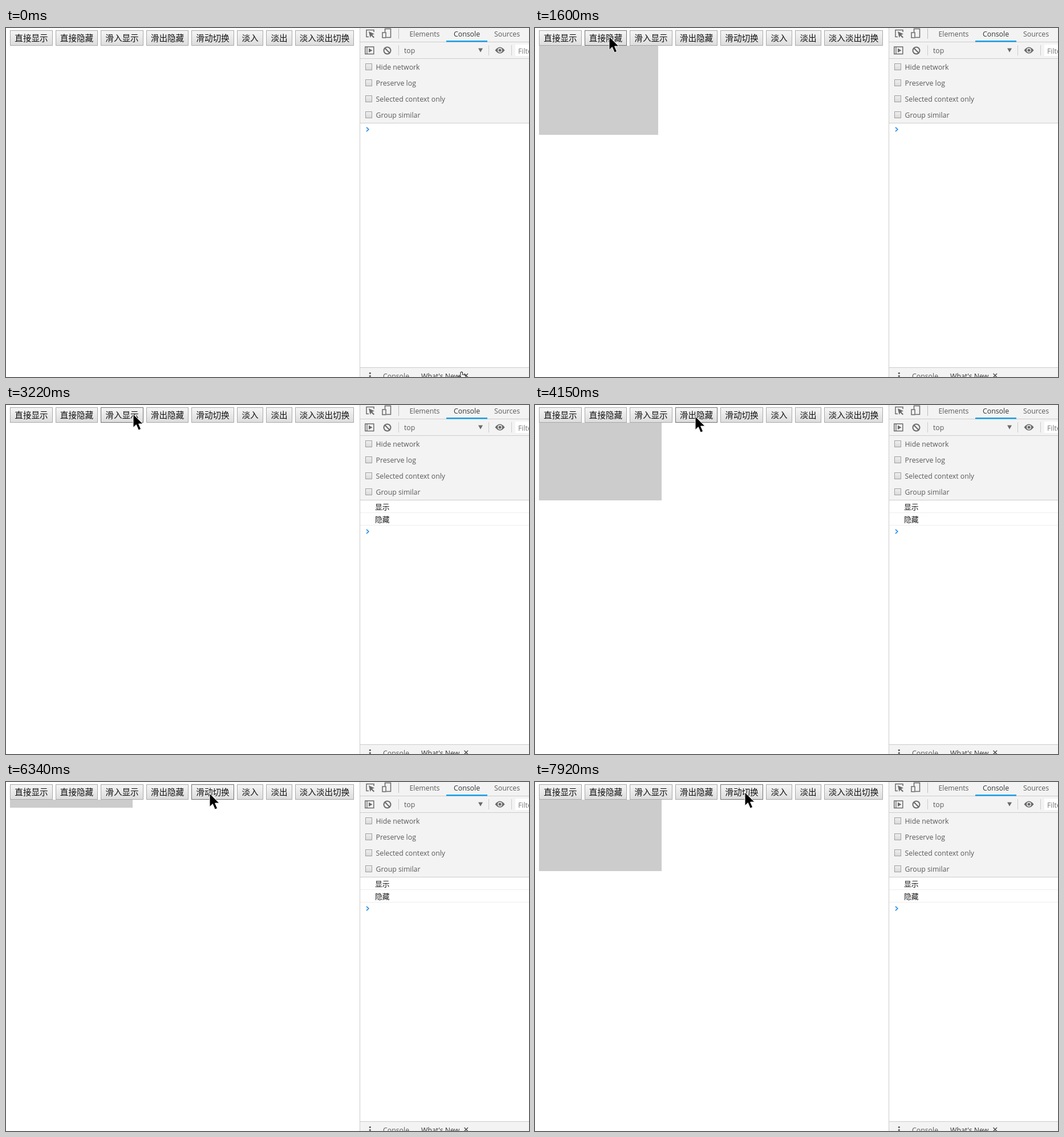
Recreate the animation shown at these times as an HTML page with a canvas. Size 917 by 611 pixels, loop 7990 ms.

```html
<!DOCTYPE html>
<html lang="zh">
<head>
<meta charset="utf-8">
<title>Show, hide and slide</title>
<style>
html, body { margin: 0; width: 100%; height: 100%; overflow: hidden; background: #fff; }
canvas { display: block; width: 917px; height: 611px; }
</style>
</head>
<body>
<canvas id="stage" width="917" height="611"></canvas>
<script>
const ctx = document.getElementById('stage').getContext('2d');
const LOOP = 7990, DURATION = 1000, PRESS = 120;
const UI = '"Open Sans", "Noto Sans", sans-serif';
const CJK = '"Noto Sans CJK SC", "Noto Sans CJK", sans-serif';
const PANEL = '#f3f3f3', INK = '#6a6a6a', RULE = '#ccc';

// Each click reverses the box; the first two also scale its width and fade it
const clicks = [712, 1850, 3408, 4884, 6150, 7606];
const messages = ['显示', '隐藏'];

const origin = { x: 798, y: 602 };
const moves = [
  { at: 70, time: 570, x: 45, y: 18 },
  { at: 1000, time: 560, x: 130, y: 15 },
  { at: 2100, time: 600, x: 223, y: 16 },
  { at: 3420, time: 680, x: 281, y: 20 },
  { at: 4900, time: 800, x: 357, y: 20 },
  { at: 6360, time: 540, x: 425, y: 20 },
  { at: 7010, time: 360, x: 368, y: 18 }
];

let nextX = 7;
const buttons = ['直接显示', '直接隐藏', '滑入显示', '滑出隐藏', '滑动切换', '淡入', '淡出', '淡入淡出切换']
  .map(label => {
    const x = Math.round(nextX), right = nextX + label.length * 14.4 + 17;
    nextX = right + 5;
    return { label, x, w: Math.round(right) - x };
  });

const swing = p => 0.5 - Math.cos(Math.PI * Math.min(1, Math.max(0, p))) / 2;

// The picture stalls at the end of each of the first three cycles
function stall(t) {
  const cycle = 1073, live = 690;
  if (t >= 3 * cycle) return t;
  return t - Math.max(0, t % cycle - live);
}

function pointerAt(t) {
  let { x, y } = origin;
  for (const m of moves) {
    const k = swing((t - m.at) / m.time);
    x += (m.x - x) * k;
    y += (m.y - y) * k;
  }
  return [Math.round(x), Math.round(y)];
}

function rect(x, y, w, h, color) {
  ctx.fillStyle = color;
  ctx.fillRect(x, y, w, h);
}

function text(str, x, y, color = '#5a5a5a', font = '12.3px ' + UI) {
  ctx.font = font;
  ctx.fillStyle = color;
  ctx.fillText(str, x, y);
}

function shape(points, { fill, stroke, width = 1, close = true }) {
  ctx.beginPath();
  points.forEach(([x, y]) => ctx.lineTo(x, y));
  if (close) ctx.closePath();
  if (fill) { ctx.fillStyle = fill; ctx.fill(); }
  if (stroke) { ctx.strokeStyle = stroke; ctx.lineWidth = width; ctx.stroke(); }
}

function line(x0, y0, x1, y1, stroke, width = 1) {
  shape([[x0, y0], [x1, y1]], { stroke, width, close: false });
}

function frame(x, y, w, h, color, width = 1) {
  ctx.strokeStyle = color;
  ctx.lineWidth = width;
  ctx.strokeRect(x, y, w, h);
}

function disc(x, y, r, color) {
  ctx.beginPath();
  ctx.arc(x, y, r, 0, Math.PI * 2);
  ctx.fillStyle = color;
  ctx.fill();
}

function shade(y, h, top, bottom) {
  const g = ctx.createLinearGradient(0, y, 0, y + h);
  g.addColorStop(0, top);
  g.addColorStop(1, bottom);
  return g;
}

function drawBox(t) {
  const i = clicks.filter(c => c <= t).length - 1;
  if (i < 0) return;
  const k = swing((t - clicks[i]) / DURATION);
  const size = i % 2 ? 1 - k : k;
  const spread = i < 2 ? size : 1;
  ctx.globalAlpha = spread;
  rect(7, 31, Math.round(215 * spread), Math.round(161 * size), '#ccc');
  ctx.globalAlpha = 1;
}

function drawButton({ label, x, w }, hover, pressed) {
  rect(x, 4, w, 27, pressed ? shade(4, 27, '#dcdcdc', '#ececec') : shade(4, 27, '#f6f6f6', '#dcdcdc'));
  frame(x + 0.5, 4.5, w - 1, 26, hover ? '#707070' : '#a8a8a8');
  ctx.textAlign = 'center';
  text(label, x + w / 2, 23, '#111', '14.6px ' + CJK);
  ctx.textAlign = 'left';
}

function drawTabs() {
  // inspect icon
  shape([[636, 15.5], [632, 15.5], [632, 3.5], [645, 3.5], [645, 7]], { stroke: INK, width: 1.5, close: false });
  shape([[636, 6], [646, 10.5], [642, 12], [646, 16], [644.5, 17.5], [640.5, 13.5], [638.5, 17]], { fill: INK });
  // device icon
  frame(664.5, 1.5, 10, 15, INK, 1.5);
  rect(659, 7, 8, 11, PANEL);
  frame(660, 8, 6, 9, INK, 1.5);
  rect(688, 1, 1, 18, '#bbb');
  text('Elements', 707.5, 14.5);
  text('Console', 785, 14.5, '#333');
  text('Sources', 856, 14.5);
  rect(621, 24, 296, 1, RULE);
  rect(772, 22, 72, 2.5, '#1a9fe8');
}

function drawToolbar() {
  frame(629.8, 33, 15, 12.5, INK, 1.5);
  line(633, 33, 633, 45.5, INK, 1.3);
  shape([[636, 35.5], [642.5, 39.2], [636, 43]], { fill: INK });
  disc(668.5, 39.5, 7, INK);
  disc(668.5, 39.5, 5, PANEL);
  line(664.3, 35.3, 672.7, 43.7, INK, 2);
  for (const x of [688, 846, 886]) rect(x, 30, 1, 18, RULE);
  text('top', 698, 44);
  shape([[828, 35.5], [836, 35.5], [832, 42.5]], { fill: INK });
  // eye icon
  ctx.beginPath();
  ctx.moveTo(857.5, 39);
  ctx.quadraticCurveTo(866, 28, 874.5, 39);
  ctx.quadraticCurveTo(866, 50, 857.5, 39);
  ctx.fillStyle = INK;
  ctx.fill();
  disc(866, 39, 3.9, PANEL);
  disc(866, 39, 2.5, INK);
  rect(893, 29, 24, 20, '#fff');
  text('Filter', 898, 44.5, '#777');
  rect(621, 53, 296, 1, RULE);
}

function drawSettings() {
  ['Hide network', 'Preserve log', 'Selected context only', 'Group similar'].forEach((label, i) => {
    const y = 62 + i * 28;
    rect(630, y, 12, 12, shade(y, 12, '#f0f0f0', '#d8d8d8'));
    frame(630.5, y + 0.5, 11, 11, '#a0a0a0');
    text(label, 648.5, y + 11);
  });
  rect(621, 166, 296, 1, RULE);
}

function drawConsole(t) {
  const shown = messages.filter((_, i) => t >= clicks[i] + DURATION);
  shown.forEach((msg, i) => {
    text(msg, 647, 182.5 + i * 22, '#1a1a1a', '12.8px ' + CJK);
    rect(621, 188 + i * 22, 296, 1, '#eee');
  });
  const y = 177.5 + shown.length * 22;
  shape([[632, y - 3.7], [635.8, y], [632, y + 3.7]], { stroke: '#2a8fe6', width: 1.7, close: false });
}

function drawDrawer() {
  rect(621, 594, 296, 17, PANEL);
  rect(621, 594, 296, 1, RULE);
  for (const y of [604.3, 609.3]) disc(638.3, y, 1.6, '#5a5a5a');
  text('Console', 661, 613.5);
  text("What's New", 728, 613.5, '#333');
  line(803.5, 605, 810, 611.5, '#555', 1.6);
  line(810, 605, 803.5, 611.5, '#555', 1.6);
}

function drawPointer(x, y, hand) {
  ctx.save();
  ctx.translate(x, y);
  ctx.lineJoin = 'round';
  if (hand) {
    shape([[-1, 1], [1, 0], [2.5, 1], [2.5, 5], [5, 5], [8, 6.5], [8.5, 13], [-1, 13], [-5, 8], [-3.5, 7], [-1, 9]],
      { fill: '#fff', stroke: '#222', width: 1.1 });
  } else {
    shape([[0, 0], [0, 23.5], [5.3, 18.5], [9.4, 28], [13.6, 26.2], [9.6, 17], [17, 17]],
      { fill: '#000', stroke: '#fff' });
  }
  ctx.restore();
}

function draw(t) {
  const [px, py] = pointerAt(t);
  const pressed = clicks.some(c => t >= c - PRESS && t < c);
  rect(0, 0, 917, 611, '#fff');
  drawBox(t);
  for (const b of buttons) {
    const hover = px >= b.x && px < b.x + b.w && py >= 4 && py < 31;
    drawButton(b, hover, hover && pressed);
  }
  rect(621, 0, 296, 166, PANEL);
  drawTabs();
  drawToolbar();
  drawSettings();
  drawConsole(t);
  drawDrawer();
  rect(620, 0, 1, 611, RULE);
  drawPointer(px, py, t < moves[0].at);
}

const start = performance.now();
function tick() {
  draw(stall((performance.now() - start) % LOOP));
  requestAnimationFrame(tick);
}
tick();
</script>
</body>
</html>
```
